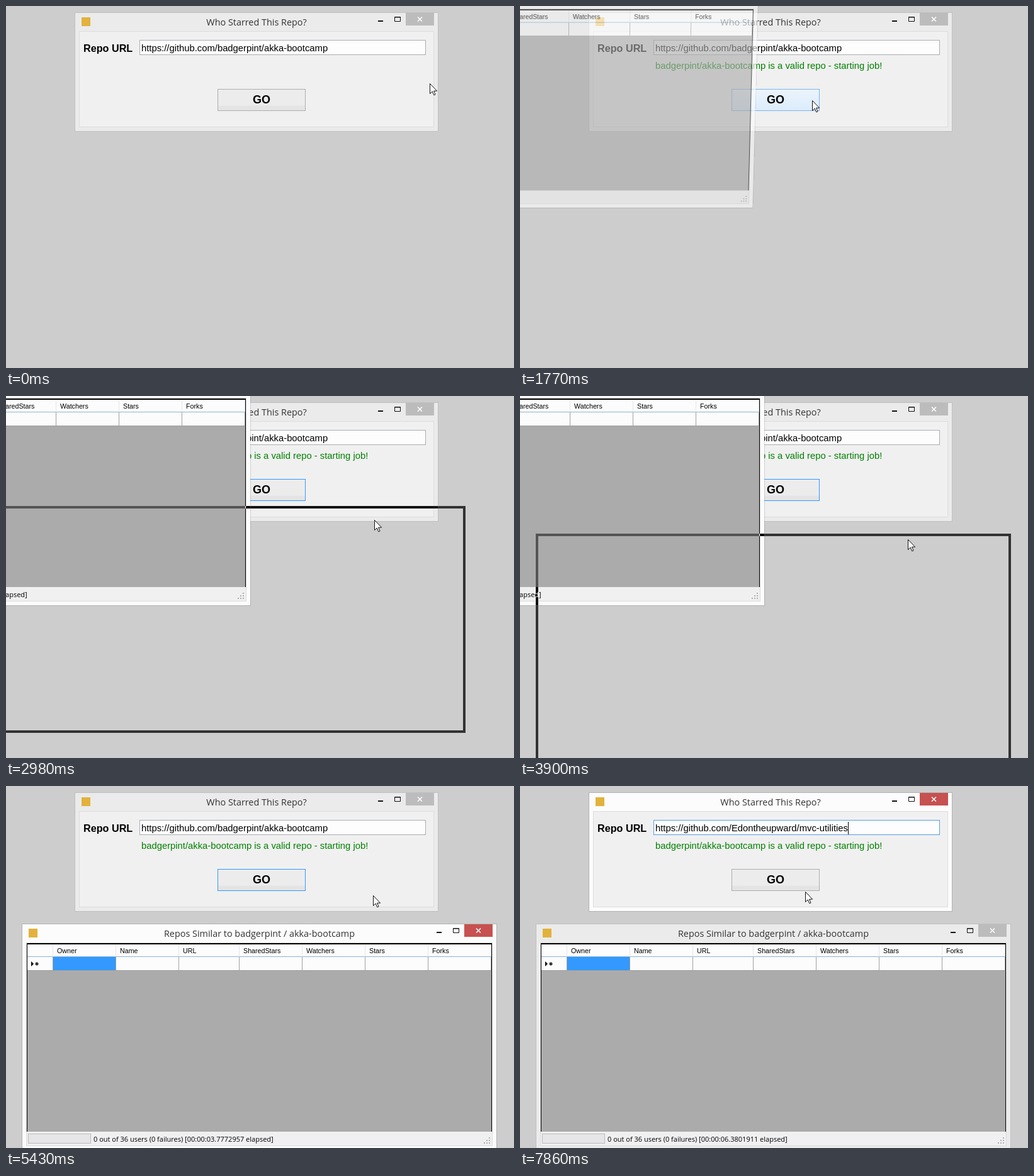
An HTML page that plays this animation: 807x576 px, repeating every 8 s.

```html
<!DOCTYPE html>
<html lang="en">
<head>
<meta charset="utf-8">
<title>Repo stars</title>
<style>
html, body { margin: 0; width: 100%; height: 100%; overflow: hidden; background: #cdcdcd; }
#stage { position: relative; width: 807px; height: 576px; overflow: hidden; background: #cdcdcd; isolation: isolate; }
#stage div, #stage svg { position: absolute; box-sizing: border-box; }
.win { background: #ebebeb; box-shadow: 0 0 0 1px #0001; }
.win.active { background: #fcfcfc; box-shadow: 0 0 0 1px #0002; }
.client { inset: 29px 6px 6px; background: #f0f0f0; border: 1px solid #dcdcdc; }
.text { white-space: pre; font: 14.8px/20px "Liberation Sans", Arial, sans-serif; }
.title { width: 100%; top: 5px; text-align: center; font: 14.4px/20px "Open Sans", sans-serif; color: #333; }
.icon { left: 10px; top: 7px; width: 14px; height: 14px; background: #e3b23c; }
.controls { right: 0; top: 0; }
.close { fill: #bcbcbc; }
.active .close { fill: #c75050; }

#form { left: 110px; top: 11px; width: 576px; height: 188px; }
#label { left: 13px; top: 46px; font-weight: bold; font-size: 16.2px; }
#field { left: 102px; top: 43px; width: 455px; height: 24px; background: #fdfdfd; border: 1px solid #abadb3; }
#field.hover { border-color: #7eb4ea; }
#field.focus { border-color: #569de5; }
#url { left: 2px; top: 2px; }
#url.selected { background: #39f; color: #fff; }
#url.caret { box-shadow: 1px 0 #000; }
#valid { left: 105px; top: 74px; color: #008000; }
#go { left: 226px; top: 121px; width: 140px; height: 35px; border: 1px solid #adadad; text-align: center;
  font-weight: bold; font-size: 18px; line-height: 33px; background: linear-gradient(#ececec 76%, #e4e4e4 80%); }
#go.focus { border-color: #39f; }
#go.hover { border-color: #7eb4ea; background: linear-gradient(#ebf4fc, #dcecfc); }
#go.pressed { border-color: #569de5; background: linear-gradient(#daecfc, #c4e0fc); }

#results { width: 753px; height: 359px; }
#grid { left: 7px; top: 30px; width: 739px; height: 300px; background: #ababab; border: solid #000; border-width: 2px 1px 0; }
#columns { display: flex; }
#stage .column { position: relative; width: 100px; height: 42px; }
#stage .column:first-child { width: 41px; }
#stage .column:nth-child(4) { width: 96px; }
.head, .cell { width: 100%; background: #fcfcfc; border: solid #a0a0a0; border-width: 0 1px 1px 0; }
.head { height: 20px; border-color: #e3e6ea; border-bottom-color: #8fb4d4; padding-left: 6px; font-size: 10.7px; }
.cell { top: 20px; height: 22px; }
.column:nth-child(2) .cell { background: #39f; }
#progress { left: 9px; top: 333px; width: 100px; height: 16px; background: #e6e6e6; border: 1px solid #bcbcbc; }
#status { left: 113px; top: 332px; font: 11px/20px "Open Sans", sans-serif; }
#outline { width: 755px; height: 361px; border: 4px solid #fff; mix-blend-mode: difference; }
#arrow, #beam { overflow: visible; }
</style>
</head>
<body>
<div id="stage"></div>
<script>
const LOOP = 8000, STEP = 135;
const CLICK = 1060, VALID = 1210, OPEN = 1640, DRAG = 2740, DROP = 4310, EDIT = 6520, SELECT = 6780, PASTE = 7040;
const HOST = 'https://github.com/', OWNER = 'badgerpint', REPO = OWNER + '/akka-bootcamp';

const windowHtml = (id, title, content) => `
  <div id="${id}" class="win">
    <div class="icon"></div><div class="text title">${title}</div>
    <svg class="controls" width="95" height="20">
      <path d="M0 12h8v2H0z" fill="#111"/>
      <path d="M26.5 6.5h9v7h-9zM26 7h10" fill="none" stroke="#111"/>
      <path class="close" d="M44 0h45v20H44z"/>
      <path d="M63 6.5l7 7m0-7l-7 7" stroke="#fff" stroke-width="1.6"/>
    </svg>
    <div class="client"></div>${content}
  </div>`;

const columns = ['', 'Owner', 'Name', 'URL', 'SharedStars', 'Watchers', 'Stars', 'Forks']
  .map(name => `<div class="column"><div class="text head">${name}</div><div class="cell"></div></div>`).join('');

let grip = '';
for (let row = 0; row < 3; row++) {
  for (let col = 2 - row; col < 3; col++) grip += `M${col * 4} ${row * 4}h2v2h-2z`;
}

document.getElementById('stage').innerHTML =
  windowHtml('form', 'Who Starred This Repo?', `
    <div id="label" class="text">Repo URL</div>
    <div id="field"><div id="url" class="text"></div></div>
    <div id="valid" class="text">${REPO} is a valid repo - starting job!</div>
    <div id="go" class="text">GO</div>`) +
  windowHtml('results', `Repos Similar to ${OWNER} / akka-bootcamp`, `
    <div id="grid"><div id="columns">${columns}</div></div>
    <svg style="left:14px;top:59px" width="14" height="9">
      <path d="M0 0v8l4-4z"/><path d="M9 1v6M6 4h6M7 2l4 4m0-4l-4 4" stroke="#000"/>
    </svg>
    <div id="progress"></div><div id="status" class="text"></div>
    <svg style="left:733px;top:339px" width="10" height="10"><path d="${grip}" fill="#b0b0b0"/></svg>`) + `
  <div id="outline"></div>
  <svg id="arrow" width="13" height="20"><path d="M.5 .5v16l3.7-3.5 2.6 5.8 2.3-1-2.6-5.6h5.1z" fill="#fff" stroke="#111"/></svg>
  <svg id="beam" width="8" height="17"><path d="M-3 -7.5H3M0 -7V8M-3 8.5H3" fill="none" stroke="#111" stroke-width="1.2"/></svg>`;

const $ = Object.fromEntries([...document.querySelectorAll('[id]')].map(el => [el.id, el]));

// Progress in recorder-sized jumps; the first jump falls on the start itself.
function stepped(t, start, end) {
  if (t < start) return 0;
  if (t >= end) return 1;
  const count = Math.round((end - start) / STEP);
  return (Math.floor((t - start) / (end - start) * count) + 1) / (count + 1);
}

// Pointer glides: start, end, destination
const glides = [
  [120, 660, 464, 150],
  [1910, 2590, 231, -50],
  [DRAG, 2980, 585, 197],
  [3130, 3780, 616, 228],
  [5430, 6280, 517, 68],
  [PASTE, 7430, 525, 180],
  [7580, 7860, 453, 168],
];

function pointer(t) {
  let x = 673, y = 123;
  for (const [start, end, toX, toY] of glides) {
    const ease = 1 - (1 - stepped(t, start, end)) ** 2.65;
    x += (toX - x) * ease;
    y += (toY - y) * ease;
  }
  return [x, y];
}

const show = (el, on) => { el.style.visibility = on ? 'visible' : 'hidden'; };
const move = (el, x, y) => { el.style.left = Math.round(x) + 'px'; el.style.top = Math.round(y) + 'px'; };
const inside = (x, y, l, t, r, b) => x >= l && x < r && y >= t && y < b;

function draw(t) {
  const between = (a, b) => t >= a && t < b;
  const [x, y] = pointer(t);
  const editing = t >= EDIT, pasted = t >= PASTE;
  const overField = inside(x, y, 212, 54, 667, 78);

  $.form.classList.toggle('active', between(CLICK, OPEN) || editing);
  $.field.className = editing ? 'focus' : overField ? 'hover' : '';
  $.url.textContent = HOST + (pasted ? 'Edontheupward/mvc-utilities' : REPO);
  $.url.classList.toggle('selected', between(SELECT, PASTE));
  $.url.classList.toggle('caret', pasted || between(EDIT, SELECT));
  show($.valid, t >= VALID);
  $.go.classList.toggle('focus', between(CLICK, EDIT));
  $.go.classList.toggle('hover', inside(x, y, 336, 132, 476, 167));
  $.go.classList.toggle('pressed', between(CLICK, VALID));

  // The results window fades in while tilting toward the viewer.
  const tilt = 3 * (1 - stepped(t, OPEN - 10, 1910));
  show($.results, t >= OPEN);
  $.results.classList.toggle('active', !editing);
  $.results.style.opacity = 1 - .38 * tilt;
  $.results.style.transform = tilt
    ? `perspective(720px) translate3d(0,${-3.3 * tilt}px,${-28 * tilt}px) rotateX(${-3 * tilt}deg)` : 'none';
  if (t < DROP) move($.results, -365, -26);
  else move($.results, 26, 220);

  const ticks = Math.floor((t - DROP) / 142);
  const elapsed = (2.7650586 + ticks * .1446053).toFixed(7);
  $.status.textContent = tilt ? '' : `0 out of 36 users (0 failures) [00:00:0${elapsed} elapsed]`;

  // The drag outline trails the pointer slightly.
  const [trailX, trailY] = pointer(t - 110);
  show($.outline, between(DRAG, DROP));
  move($.outline, trailX - 591, trailY - 9);

  show($.arrow, !overField);
  show($.beam, overField);
  move($.arrow, x, y);
  move($.beam, x, y);
}

function frame() {
  draw(performance.now() % LOOP);
  requestAnimationFrame(frame);
}
frame();
</script>
</body>
</html>
```
